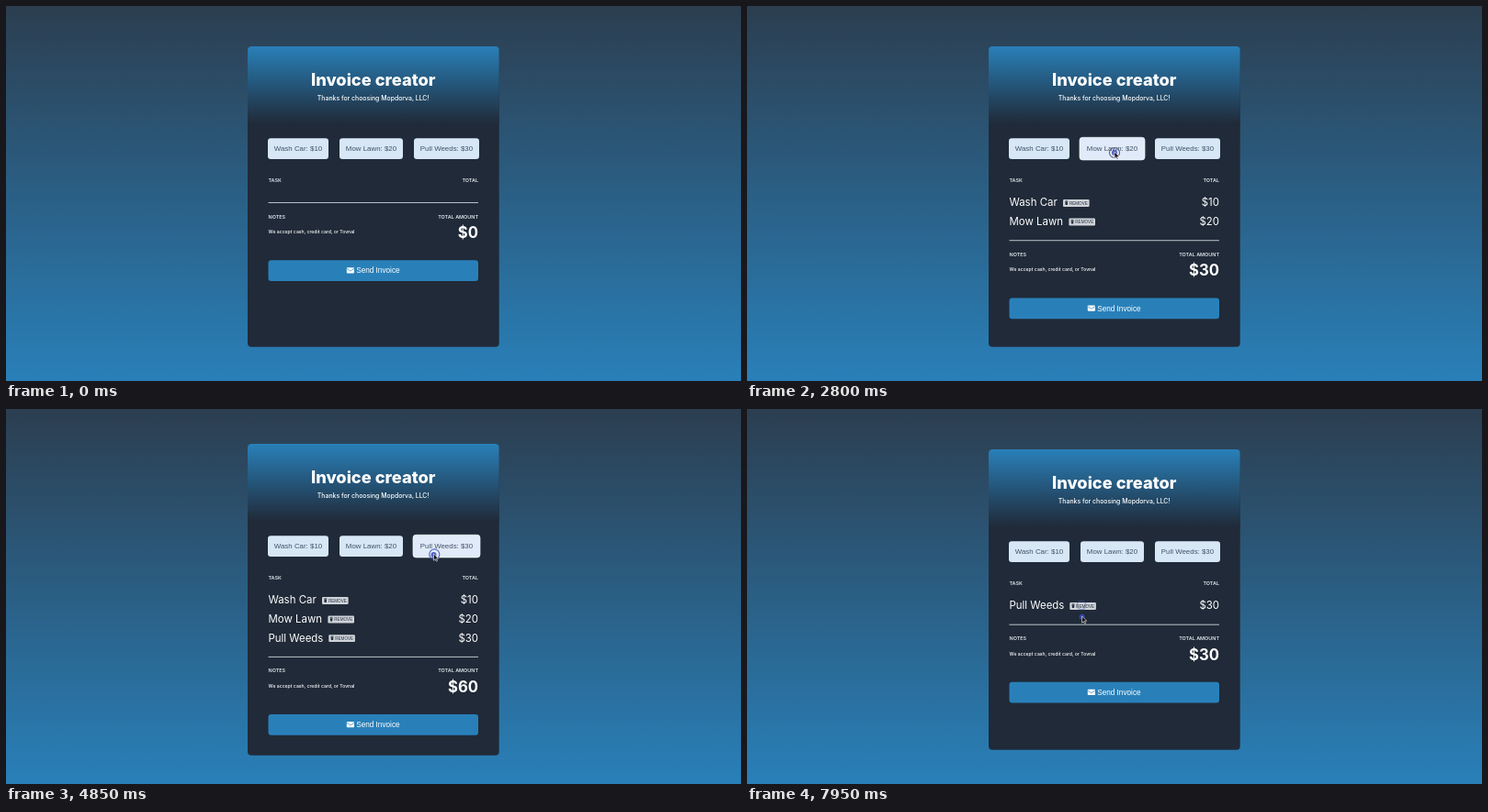
Write an HTML page that moves like this. It is 800x409 px and loops after 8000 ms.

```html
<!DOCTYPE html>
<html lang="en">
<head>
<meta charset="utf-8">
<title>Invoice creator</title>
<style>
  html, body { margin: 0; width: 100%; height: 100%; overflow: hidden; }
  svg { display: block; width: 100vw; height: 100vh; }
  text { font-family: Inter, sans-serif; fill: #fff; white-space: pre; }
  .arial { font-family: "Liberation Sans", Arial, sans-serif; }
  .title { font-size: 18.3px; font-weight: 800; text-anchor: middle; }
  .sub { font-size: 6.9px; font-weight: 500; text-anchor: middle; }
  .label { font-size: 5.45px; font-weight: 600; fill: #dde4ea; }
  .note { font-size: 5.14px; font-weight: 500; }
  .row { font-size: 11.45px; }
  .sum { font-size: 16.7px; font-weight: 700; }
  .end { text-anchor: end; }
  .pick { font-size: 7.9px; fill: #40526a; text-anchor: middle; }
  .send { font-size: 8.2px; }
  .remove { font-size: 4.6px; fill: #273241; }
</style>
</head>
<body>
<svg viewBox="0 0 800 409" preserveAspectRatio="none">
  <defs>
    <linearGradient id="sky" x1="0" y1="0" x2="0" y2="1">
      <stop offset="0" stop-color="#2c3e50"/><stop offset="1" stop-color="#2980b9"/>
    </linearGradient>
    <linearGradient id="head" x1="0" y1="0" x2="0" y2="1">
      <stop offset="0" stop-color="#2980b9"/><stop offset="1" stop-color="#202a38"/>
    </linearGradient>
  </defs>
  <rect width="800" height="409" fill="url(#sky)"/>
  <rect id="card" x="263" width="273.7" rx="4" fill="#202a38"/>
  <g id="body">
    <path d="M263 129V48q0-4 4-4h265.7q4 0 4 4V129z" fill="url(#head)"/>
    <text class="title" x="399.7" y="86.6">Invoice creator</text>
    <text class="sub" x="399.7" y="102.6">Thanks for choosing Mopdorva, LLC!</text>
    <g id="picks"></g>
    <text class="label" x="285.5" y="192.4">TASK</text>
    <text class="label end" x="514" y="192.4">TOTAL</text>
    <g id="rows"></g>
    <g id="foot">
      <rect x="285.5" y="214.1" width="228.5" height=".9" fill="#cdd4da"/>
      <text class="label" x="285.5" y="231.6">NOTES</text>
      <text class="label end" x="514" y="231.6">TOTAL AMOUNT</text>
      <text class="note" x="285.5" y="248.2">We accept cash, credit card, or Tovnal</text>
      <text class="sum end" id="sum" x="514" y="253.1"></text>
      <rect x="285.5" y="277.2" width="228.5" height="22.8" rx="3" fill="#2980b9"/>
      <rect x="370.8" y="285.2" width="8.2" height="6.3" rx=".9" fill="#fff"/>
      <path d="M370.9 286.4l4 2.7 4-2.7" fill="none" stroke="#2980b9" stroke-width=".7"/>
      <text class="arial send" x="381.2" y="291.4">Send Invoice</text>
    </g>
  </g>
  <g id="rings" fill="none" stroke-width="1.2"></g>
  <circle id="dot" r="3" fill="#3b4bb8" fill-opacity=".85"/>
  <path id="arrow" d="M0 0V7.2L1.7 5.7 2.8 8.2 4 7.7 2.9 5.2H5.1Z" fill="#111" stroke="#fff" stroke-width=".6"/>
</svg>
<script>
const LOOP = 8000, PITCH = 20.6;
const $ = id => document.getElementById(id);

const tasks = [
  { name: 'Wash Car', price: 10, x: 285, w: 66, badge: 344 },
  { name: 'Mow Lawn', price: 20, x: 363, w: 69, badge: 350.4 },
  { name: 'Pull Weeds', price: 30, x: 444, w: 71, badge: 351.3 }
];

// time, indexes of the billed tasks
const bills = [
  [0, []], [1950, [0]], [2800, [0, 1]], [3800, [0, 1, 2]],
  [6900, [1, 2]], [7600, [2]]
];

// time, x, y of the pointer
const path = [
  [250, 637, 122], [550, 624, 136], [750, 624, 136], [1150, 468, 208],
  [1500, 312, 161], [1600, 312, 160.5], [2050, 312, 160.5], [2550, 400, 159],
  [2900, 400, 159], [3450, 470, 157], [3650, 470, 157], [3700, 468, 157],
  [4500, 465.5, 158], [5950, 465.5, 158], [6250, 446, 174], [6480, 390, 220],
  [6750, 365, 207.5], [7650, 365, 207.5], [7950, 364.6, 226], [8000, 364.6, 226]
];

// start, life, x, y, first radius, last radius, colour
const rings = [
  [1950, 350, 312.5, 162, 5.5, 12, '#4b5378'],
  [2800, 350, 400, 160, 5.5, 12, '#4b5378'],
  [3750, 500, 467, 158.5, 5, 12, '#3f57b5'],
  [4850, 200, 466.3, 158.5, 5.5, 12, '#3f57b5'],
  [5250, 550, 466, 158.5, 5, 12.5, '#3f57b5'],
  [5950, 420, 466, 158, 3, 3.8, '#9fb2cf'],
  [6850, 250, 365, 209, 2, 8, '#4b5378'],
  [7600, 800, 364, 214, 4, 6, '#3f57b5']
];

// Smooth curve through the points, at rest beside every pause
function pointer(t) {
  if (t <= path[0][0]) return path[0].slice(1);
  let i = 0;
  while (i < path.length - 2 && t >= path[i + 1][0]) i++;
  const a = path[i], b = path[i + 1], span = b[0] - a[0];
  const u = Math.min(1, (t - a[0]) / span);
  const still = (p, q) => !p || !q || Math.hypot(q[1] - p[1], q[2] - p[2]) < 3;
  const slope = (k, d) => {
    const p = path[k - 1], c = path[k], n = path[k + 1];
    return still(p, c) || still(c, n) ? 0 : (n[d] - p[d]) / (n[0] - p[0]) * span;
  };
  return [1, 2].map(d => {
    const u2 = u * u, u3 = u2 * u;
    return a[d] * (2 * u3 - 3 * u2 + 1) + b[d] * (3 * u2 - 2 * u3)
      + slope(i, d) * (u3 - 2 * u2 + u) + slope(i + 1, d) * (u3 - u2);
  });
}

const billAt = t => bills.filter(b => b[0] <= t).pop()[1];
const shiftOf = bill => bill.length > 2 ? -6 : 0;

// 0..1, settles within a tenth of a second
function hover(t, task, dy) {
  let n = 0;
  for (const lag of [0, 40, 80]) {
    const [x, y] = pointer(t - lag);
    if (x > task.x && x < task.x + task.w && y > 144.3 + dy && y < 167 + dy) n++;
  }
  return n / 3;
}

function pick(task, h) {
  const mid = task.x + task.w / 2;
  return `<rect x="${task.x - h}" y="${144.3 - h}" width="${task.w + 2 * h}" height="${22.6 + 2 * h}"
    rx="3.2" fill="${h > .5 ? '#e1eaf8' : '#d7e7f5'}" stroke="#f4f8fd" stroke-width="${.7 * h}"/>
    <text class="arial pick" x="${mid}" y="158.3">${task.name}: $${task.price}</text>`;
}

function row(task, i) {
  const y = 218.3 + i * PITCH, b = task.badge;
  return `<text class="row" x="285.5" y="${y}">${task.name}</text>
    <rect x="${b}" y="${y - 7.3}" width="28.6" height="7.9" rx="1.2" fill="#d0d4d9"/>
    <path d="M${b + 2} ${y - 5.3}h3.4M${b + 3} ${y - 5.7}h1.4" stroke="#273241" stroke-width=".6"/>
    <path d="M${b + 2.3} ${y - 4.7}h2.8l-.3 3.3h-2.2z" fill="#273241"/>
    <text class="arial remove" x="${b + 6.9}" y="${y - 1.7}">REMOVE</text>
    <text class="row end" x="514" y="${y}">$${task.price}</text>`;
}

function ring([start, life, x, y, r0, r1, color], t) {
  const u = (t - start) / life;
  if (u < 0 || u >= 1) return '';
  return `<circle cx="${x}" cy="${y}" r="${r0 + (r1 - r0) * u}" stroke="${color}" opacity="${.85 * (1 - u)}"/>`;
}

let shown = null;
function draw(t) {
  const bill = billAt(t), dy = shiftOf(bill);
  if (bill !== shown) {
    shown = bill;
    $('card').setAttribute('y', 44 + dy);
    $('card').setAttribute('height', 327.7 - 2 * dy);
    $('body').setAttribute('transform', `translate(0 ${dy})`);
    $('foot').setAttribute('transform', `translate(0 ${bill.length * PITCH})`);
    $('rows').innerHTML = bill.map((k, i) => row(tasks[k], i)).join('');
    $('sum').textContent = '$' + bill.reduce((s, k) => s + tasks[k].price, 0);
  }
  $('picks').innerHTML = tasks.map(k => pick(k, hover(t, k, dy))).join('');
  $('rings').innerHTML = rings.map(r => ring(r, t)).join('');

  const [x, y] = pointer(t), [dx, dotY] = pointer(t - 25);
  const seen = t >= 250 ? 1 : 0;
  $('arrow').setAttribute('transform', `translate(${x} ${y})`);
  $('arrow').setAttribute('opacity', seen);
  $('dot').setAttribute('cx', dx);
  $('dot').setAttribute('cy', dotY + 1);
  $('dot').setAttribute('opacity', seen);
}

const begin = performance.now();
function tick() {
  draw((performance.now() - begin) % LOOP);
  requestAnimationFrame(tick);
}
tick();
</script>
</body>
</html>
```
